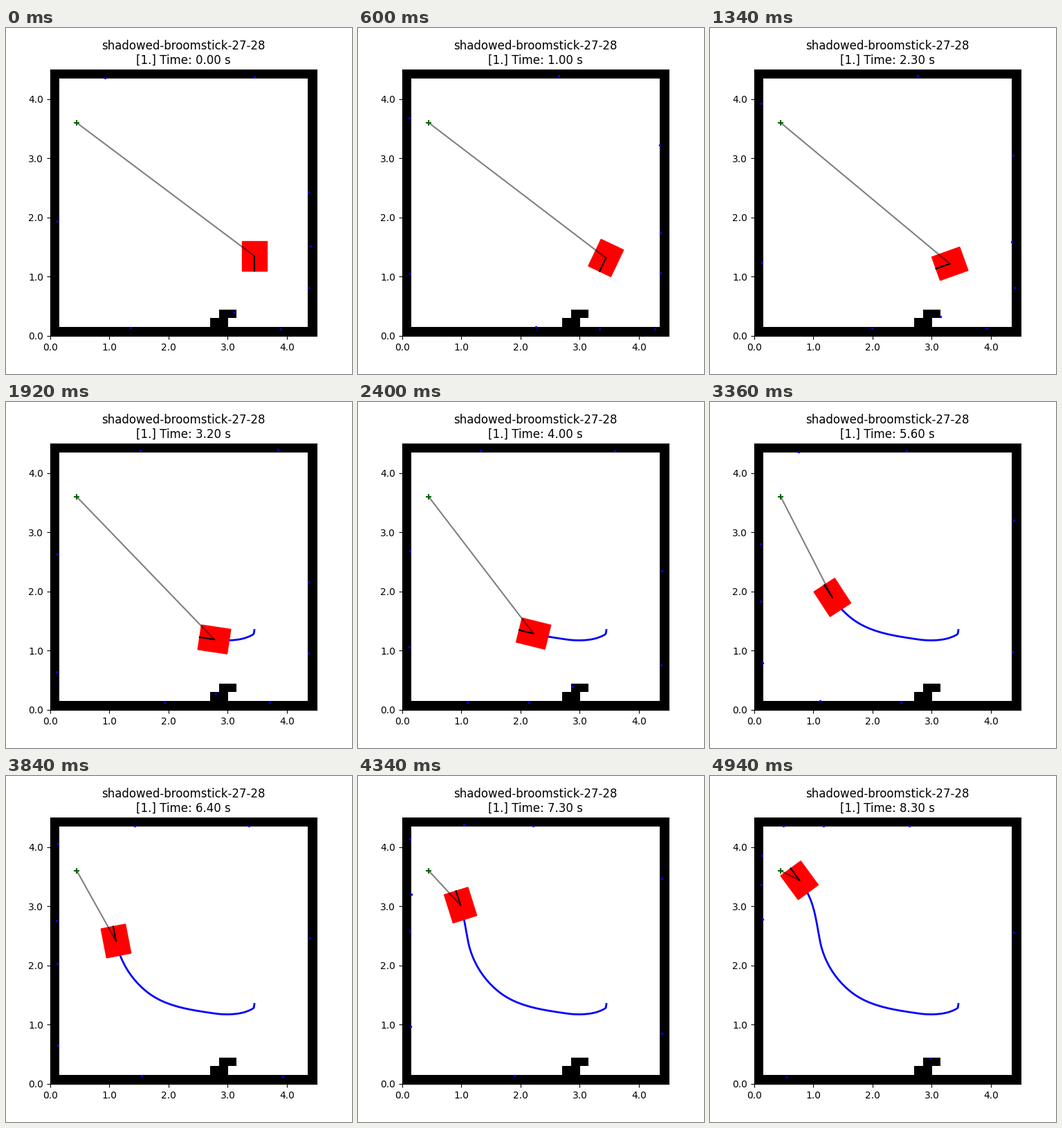
A matplotlib script for the animation above (4960 ms loop, 500x500 px).

```python
import numpy as np
import matplotlib.pyplot as plt
from matplotlib.animation import FuncAnimation
from matplotlib.patches import Polygon

SIZE = 4.5
CELL = 0.15
GOAL = np.array([0.45, 3.6])
LENGTH, WIDTH = 0.5, 0.42
DT = 0.1
STEPS = 84
TICK = 20  # ms

# a few key poses: time, x, y, heading in degrees
POSES = np.array([
    [0.0, 3.450, 1.350, -90],
    [1.0, 3.443, 1.317, -115.4],
    [2.3, 3.307, 1.220, -160.3],
    [3.2, 2.773, 1.191, 171.5],
    [4.9, 1.651, 1.543, 142.4],
    [6.4, 1.113, 2.414, 100.9],
    [7.3, 0.986, 3.020, 107.5],
    [8.3, 0.766, 3.439, 126.3],
])


def direction(angle):
    return np.stack([np.cos(angle), np.sin(angle)], axis=-1)


def speed(t):
    """Creep while turning, cruise, then slow down near the goal."""
    up = np.clip((t - 0.9) / 2.5, 0, 1)
    down = np.clip((t - 6.4) / 1.9, 0, 1)
    return 0.04 + 0.66 * up ** 2 * (3 - 2 * up) - 0.34 * down ** 2


def drive():
    """Smooth path through the key poses; the heading follows its tangent."""
    keys, spots = POSES[:, 0], POSES[:, 1:3]
    slopes = speed(keys)[:, None] * direction(np.radians(POSES[:, 3]))
    t = np.arange(STEPS) * DT
    i = np.clip(np.searchsorted(keys, t, side="right") - 1, 0, len(keys) - 2)
    h = (keys[i + 1] - keys[i])[:, None]
    s = (t - keys[i])[:, None] / h
    p, q = spots[i], spots[i + 1]
    a, b = h * slopes[i], h * slopes[i + 1]
    c2 = 3 * (q - p) - 2 * a - b
    c3 = 2 * (p - q) + a + b
    path = p + s * (a + s * (c2 + s * c3))
    tangent = a + s * (2 * c2 + 3 * s * c3)
    return path, np.arctan2(tangent[:, 1], tangent[:, 0])


def build_map():
    n = round(SIZE / CELL)
    grid = np.zeros((n, n))
    grid[[0, -1], :] = 1
    grid[:, [0, -1]] = 1
    grid[1, 18:20] = 1
    grid[2, 19:21] = 1
    return grid


def scan(grid, center, heading):
    """March nine evenly spread rays until each enters a wall."""
    rays = direction(heading + np.pi + np.radians(40) * np.arange(9))
    dist = 0.0504 * np.arange(1, 130)
    points = center + dist[None, :, None] * rays[:, None, :]
    cells = np.clip(np.floor(points / CELL).astype(int), 0, len(grid) - 1)
    first = np.argmax(grid[cells[..., 1], cells[..., 0]] > 0, axis=1)
    return points[np.arange(9), first]


def body(center, heading):
    ahead = direction(heading) * LENGTH / 2
    side = direction(heading + np.pi / 2) * WIDTH / 2
    return center + np.array([ahead + side, ahead - side, -ahead - side, side - ahead])


path, headings = drive()
grid = build_map()

fig, ax = plt.subplots(figsize=(5, 5), dpi=100)
ax.imshow(grid, cmap="gray_r", origin="lower", extent=(0, SIZE, 0, SIZE),
          interpolation="nearest")
for axis in (ax.xaxis, ax.yaxis):
    axis.set_ticks(range(5))
    axis.set_major_formatter("{x:.1f}")
ax.set_xlim(0, SIZE)
ax.set_ylim(0, SIZE)
title = ax.set_title("")

trail, = ax.plot([], [], color="blue", lw=2, zorder=2)
hits, = ax.plot([], [], "o", color="blue", ms=2.5, mew=0, zorder=2.5)
robot = ax.add_patch(Polygon(body(path[0], headings[0]), color="red", lw=1, zorder=3))
sight, = ax.plot([], [], color="black", alpha=0.5, lw=1.5, zorder=4)
nose, = ax.plot([], [], color="black", lw=1.5, zorder=5)
ax.scatter(*GOAL, marker="+", s=36, color="darkgreen", lw=1.5, zorder=6)


def update(tick):
    # steps are held alternately for 20 and 100 ms
    cycle, rest = divmod(tick * TICK, 120)
    k = 2 * cycle + (rest >= 20)
    center, heading = path[k], headings[k]
    tip = center + direction(heading) * LENGTH / 2

    title.set_text(f"shadowed-broomstick-27-28\n[1.] Time: {k * DT:.2f} s")
    trail.set_data(*path[:k + 1].T)
    hits.set_data(*scan(grid, center, heading).T)
    robot.set_xy(body(center, heading))
    sight.set_data(*zip(GOAL, center))
    nose.set_data(*zip(center, tip))
    return title, trail, hits, robot, sight, nose


anim = FuncAnimation(fig, update, frames=248, interval=TICK, repeat=True,
                     repeat_delay=0, blit=False)
plt.show()
```
